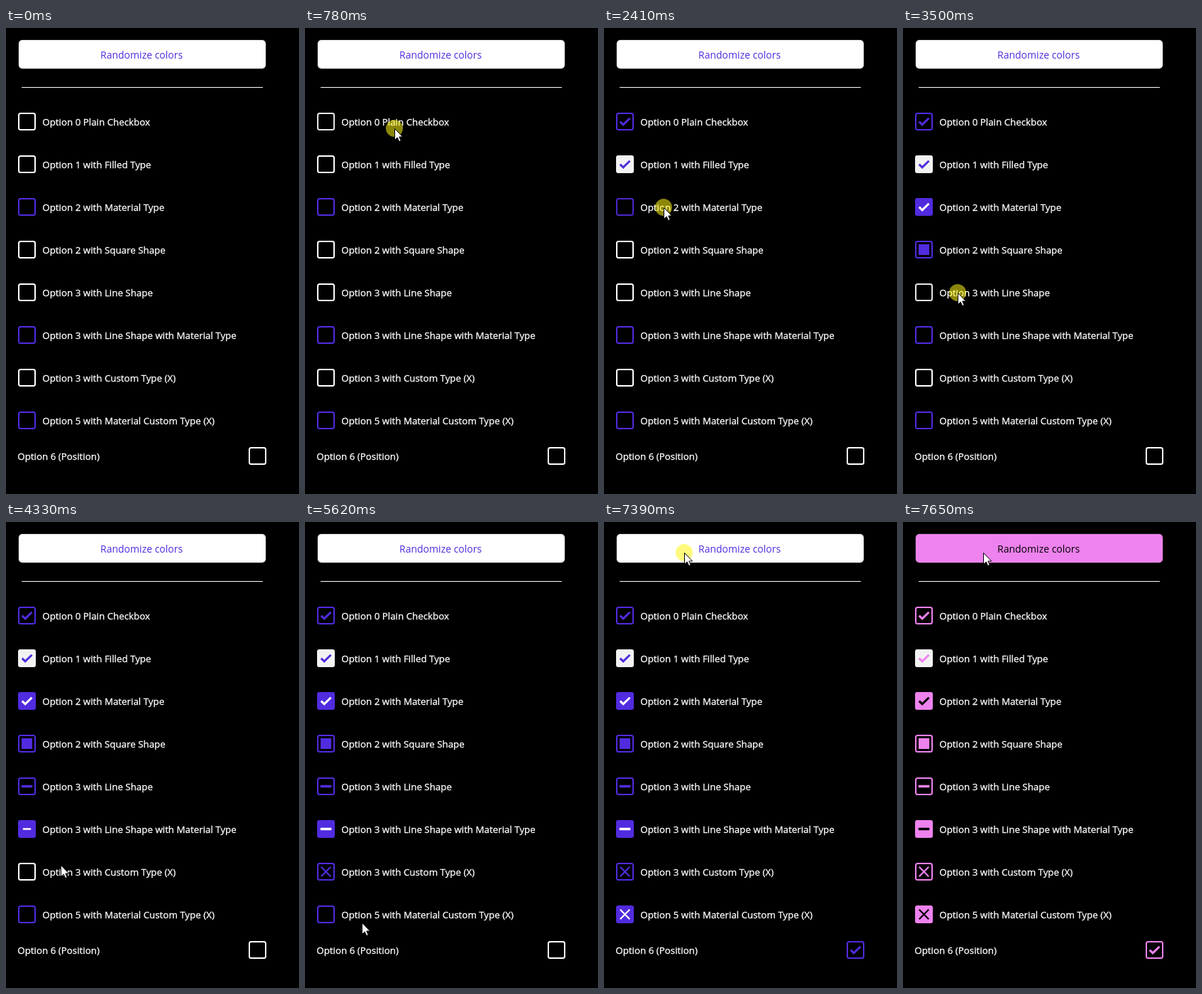
An HTML page with a canvas that plays this animation: 413x655 px, repeating every 8 s.

```html
<!DOCTYPE html>
<html lang="en">
<head>
<meta charset="utf-8">
<title>Checkbox options</title>
<style>
html, body { margin: 0; width: 100%; height: 100%; overflow: hidden; background: #000; }
canvas { display: block; width: 413px; height: 655px; }
</style>
</head>
<body>
<canvas id="stage" width="413" height="655"></canvas>
<script>
const canvas = document.getElementById("stage");
const ctx = canvas.getContext("2d");
const W = 413, H = 655, LOOP = 8000;
const BOX = 25, TOP = 119, ROW = 60;
const PRESS = 135, REST = 70, GROW = 220;
const PURPLE = "#512bdf", PINK = "#ee82ee", WHITE = "#fff";

// at: end of the click; x and drop: where the pointer aims, drop measured from the row's top
const options = [
  { label: "Option 0 Plain Checkbox", mark: "check", at: 910, x: 126, drop: 22 },
  { label: "Option 1 with Filled Type", mark: "check", type: "filled", at: 1880, x: 84, drop: 21 },
  { label: "Option 2 with Material Type", mark: "check", type: "material", at: 2500, x: 84 },
  { label: "Option 2 with Square Shape", mark: "square", at: 3030, x: 84 },
  { label: "Option 3 with Line Shape", mark: "line", at: 3570 },
  { label: "Option 3 with Line Shape with Material Type", mark: "line", type: "material", at: 4170 },
  { label: "Option 3 with Custom Type (X)", mark: "cross", at: 4530 },
  { label: "Option 5 with Material Custom Type (X)", mark: "cross", type: "material", at: 5820, x: 80, drop: 23 },
  { label: "Option 6 (Position)", mark: "check", at: 6500, drop: 18, top: 589, boxX: 342, textX: 16.3 }
].map((o, i) => ({ top: TOP + ROW * i, boxX: 17, textX: 51.3, x: 77, drop: 13, ...o }));

const button = { at: 7510, x: 113, y: 43 };
const clicks = [...options.map(o => ({ at: o.at, x: o.x, y: o.top + o.drop })), button];
const entry = { at: 50, x: 368, y: 559 };
const detour = { at: 5260, x: 84, y: 599 };
const stops = [entry, detour, ...clicks].sort((a, b) => a.at - b.at);

const clamp = k => Math.max(0, Math.min(1, k));
const easeOut = k => 1 - (1 - k) ** 2;
const isPressed = (t, at) => t >= at - PRESS && t < at;

// The pointer rests after each click, then glides to arrive at the next press
function pointerAt(t) {
  const i = stops.findIndex(s => s.at > t);
  if (i < 0) return button;
  const from = stops[i - 1], to = stops[i];
  const begin = from.at + REST;
  const k = easeOut(clamp((t - begin) / (to.at - PRESS - begin)));
  return {
    x: Math.round(from.x + (to.x - from.x) * k),
    y: Math.round(from.y + (to.y - from.y) * k)
  };
}

function roundRect(x, y, w, h, r) {
  ctx.beginPath();
  ctx.roundRect(x, y, w, h, r);
}

function polyline(points) {
  ctx.beginPath();
  points.forEach(([x, y]) => ctx.lineTo(x, y));
}

function text(str, x, y, size, color, weight = 0) {
  ctx.font = `${size}px "Open Sans", "Noto Sans", sans-serif`;
  ctx.fillStyle = ctx.strokeStyle = color;
  ctx.fillText(str, x, y);
  if (weight) {
    ctx.lineWidth = weight;
    ctx.strokeText(str, x, y);
  }
}

// Marks are drawn around the centre of their box
const marks = {
  check() {
    ctx.lineWidth = 3;
    polyline([[-6.8, 0.1], [-2.4, 4.4], [7, -4.8]]);
    ctx.stroke();
  },
  square() {
    ctx.fillRect(-7.5, -7.5, 15, 15);
  },
  line() {
    roundRect(-7.8, -1.7, 15.6, 3.4, 0.6);
    ctx.fill();
  },
  cross() {
    ctx.lineWidth = 2.2;
    for (const s of [-1, 1]) {
      polyline([[-6.7, -6.7 * s], [6.7, 6.7 * s]]);
      ctx.stroke();
    }
  }
};

function drawOption({ label, top, mark, type, at, boxX, textX }, t, accent, onAccent) {
  const checked = t >= at;
  ctx.save();
  if (isPressed(t, at)) ctx.globalAlpha = 0.9;
  if (checked && type) {
    ctx.fillStyle = type === "filled" ? "#f2f2f2" : accent;
    roundRect(boxX, top, BOX, BOX, 3);
    ctx.fill();
  } else {
    ctx.strokeStyle = checked || type === "material" ? accent : WHITE;
    ctx.lineWidth = 2;
    roundRect(boxX + 1, top + 1, BOX - 2, BOX - 2, 2.5);
    ctx.stroke();
  }
  if (checked) {
    const scale = clamp((t - at) / GROW);
    ctx.translate(boxX + BOX / 2, top + BOX / 2);
    ctx.scale(scale, scale);
    ctx.strokeStyle = ctx.fillStyle = type === "material" ? onAccent : accent;
    marks[mark]();
  }
  ctx.restore();
  text(label, textX, top + 18, 13.35, WHITE, 0.3);
}

function drawPointer(t) {
  if (t < entry.at + REST) return;
  const { x, y } = pointerAt(t);
  if (clicks.some(c => isPressed(t, c.at))) {
    ctx.fillStyle = "rgba(255, 245, 20, 0.55)";
    ctx.beginPath();
    ctx.arc(x, y, 12, 0, Math.PI * 2);
    ctx.fill();
  }
  ctx.save();
  ctx.translate(x, y);
  polyline([[0.5, 0.5], [0.5, 16.5], [4.2, 13], [6.7, 18.6], [9.2, 17.5], [6.8, 12], [11.6, 12]]);
  ctx.closePath();
  ctx.fillStyle = WHITE;
  ctx.strokeStyle = "#000";
  ctx.lineWidth = 1;
  ctx.fill();
  ctx.stroke();
  ctx.restore();
}

function drawButton(fill, color) {
  ctx.fillStyle = "#222";
  roundRect(17, 16, 350, 42, 6);
  ctx.fill();
  ctx.fillStyle = fill;
  roundRect(18, 17, 348, 40, 5);
  ctx.fill();
  text("Randomize colors", 133, 43, 14, color);
}

function draw(t) {
  const recolored = t >= button.at;
  const accent = recolored ? PINK : PURPLE;
  const onAccent = recolored ? "#000" : WHITE;
  ctx.fillStyle = "#000";
  ctx.fillRect(0, 0, W, H);

  drawButton(recolored ? PINK : WHITE, recolored ? "#000" : PURPLE);
  ctx.fillStyle = WHITE;
  ctx.fillRect(22, 83, 340, 1);

  options.forEach(o => drawOption(o, t, accent, onAccent));
  drawPointer(t);
}

const start = performance.now();
function tick() {
  draw((performance.now() - start) % LOOP);
  requestAnimationFrame(tick);
}
tick();
</script>
</body>
</html>
```
